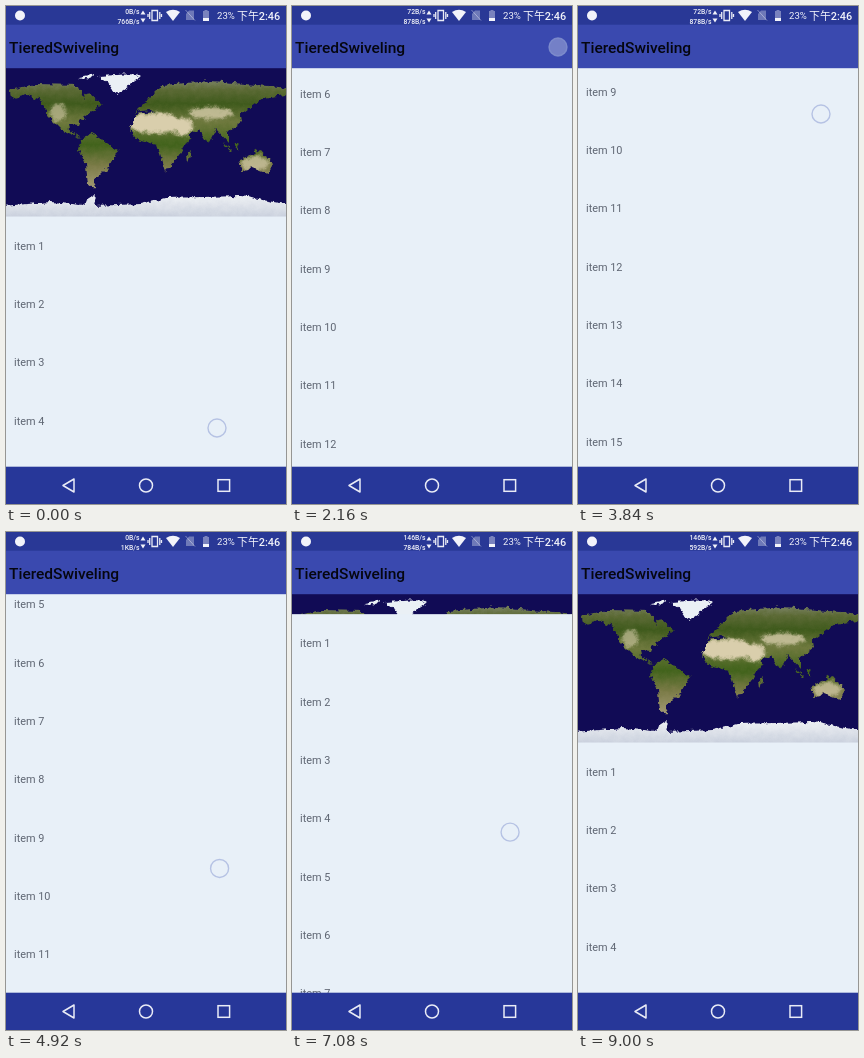
Write an HTML page that moves like this. It is 280 by 498 pixels and loops after 9.24 s.

```html
<!DOCTYPE html>
<html lang="en">
<head>
<meta charset="utf-8">
<title>Nested list</title>
<style>
  html, body { margin: 0; width: 100%; height: 100%; overflow: hidden; background: #e8f0f8; }
  svg { display: block; width: 100vw; height: 100vh; font-family: Roboto, "Noto Sans CJK SC", "Noto Sans CJK", sans-serif; }
  .item { font-size: 10.9px; fill: #5f6673; }
  .title { font-size: 15.5px; font-weight: 500; fill: #05060f; }
  .speed { font-size: 6.8px; font-weight: 500; text-anchor: end; }
  .line { fill: none; stroke: #e9ebf6; stroke-width: 1.5; }
</style>
</head>
<body>
<svg viewBox="0 0 280 498">
  <defs>
    <linearGradient id="climate" gradientUnits="userSpaceOnUse" x1="0" y1="68" x2="0" y2="182">
      <stop offset="0" stop-color="#8b907c"/>
      <stop offset=".14" stop-color="#5c6a35"/>
      <stop offset=".26" stop-color="#3f5a1c"/>
      <stop offset=".42" stop-color="#6f793e"/>
      <stop offset=".62" stop-color="#42631c"/>
      <stop offset=".8" stop-color="#7b7b47"/>
      <stop offset="1" stop-color="#a39a74"/>
    </linearGradient>
    <linearGradient id="ice" x1="0" y1="0" x2="0" y2="1">
      <stop offset="0" stop-color="#eef1f4"/>
      <stop offset="1" stop-color="#c3cad9"/>
    </linearGradient>
    <clipPath id="landClip"><use href="#land"/></clipPath>
    <filter id="soft" x="-30%" y="-50%" width="160%" height="200%"><feGaussianBlur stdDeviation="1.5"/></filter>
    <filter id="coast" filterUnits="userSpaceOnUse" x="-5" y="60" width="290" height="156" color-interpolation-filters="sRGB">
      <feTurbulence type="fractalNoise" baseFrequency=".16" numOctaves="3" seed="4"/>
      <feDisplacementMap in="SourceGraphic" scale="7" xChannelSelector="R" yChannelSelector="G"/>
    </filter>
  </defs>

  <!-- header picture, uncovered by the list -->
  <rect y="62" width="280" height="149" fill="#110b55"/>
  <g filter="url(#coast)">
    <path id="land" fill="url(#climate)" d="
      M4 84L30 78 72 79 78 92 83 86 96 98 74 114 72 119 62 118 63 125 76 133 57 125 40 108 36 94 20 89 5 93Z
      M77 131L86 128 112 143 103 160 91 172 87 182 82 178 80 160 73 143Z
      M130 108L150 106 170 112 178 125 187 126 174 148 160 165 151 139 132 134 124 124Z
      M129 106L143 92 156 79 205 75 285 82 280 89 257 92 235 108 236 115 222 126 222 136 210 123 202 138 193 123 177 133 167 113 143 104Z
      M233 153L255 145 267 159 262 168 246 162 235 165Z
      M181 148L185 145 182 157Z M228 139L235 136 232 144Z M217 136L227 146 222 144Z M248 142L260 150 252 148Z"/>
    <g clip-path="url(#landClip)"><g filter="url(#soft)" fill="#d9ceac">
      <ellipse cx="148" cy="117" rx="29" ry="10"/>
      <ellipse cx="177" cy="121" rx="10" ry="9"/>
      <ellipse cx="205" cy="107" rx="22" ry="6" opacity=".8"/>
      <ellipse cx="249" cy="157" rx="14" ry="7" opacity=".7"/>
      <ellipse cx="52" cy="106" rx="8" ry="9" opacity=".6"/>
    </g></g>
    <path fill="#eaf0f5" d="M92 70L130 68 135 71 110 88 101 76Z M72 71L90 68 84 74Z"/>
    <path fill="url(#ice)" d="M-5 200L45 196 75 199 90 189 88 200 135 198 160 192 235 190 285 199V216H-5Z"/>
  </g>

  <g id="list"><rect y="210.5" width="280" height="1300" fill="#e8f0f8"/></g>

  <rect y="18" width="280" height="44.2" fill="#3a49af"/>
  <rect width="280" height="18.7" fill="#293896"/>
  <rect y="460.7" width="280" height="37.3" fill="#273799"/>
  <text class="title" x="3" y="47">TieredSwiveling</text>

  <g fill="#f2f3fa">
    <circle cx="14" cy="9.5" r="5"/>
    <text class="speed" id="up" x="133.5" y="8.3"></text>
    <text class="speed" id="down" x="133.5" y="17.5"></text>
    <path d="M134.5 8.5L137 4.5 139.5 8.5Z M134.5 12.5L137 16.5 139.5 12.5Z"/>
    <path d="M160 6Q167 1.5 174 6L167 15Z"/>
    <path opacity=".35" d="M183 4.5H188V14H180V8Z"/>
    <path opacity=".4" d="M198.5 4H201.5V5H203V15H197V5H198.5Z"/>
    <path d="M197 12H203V15H197Z"/>
    <text x="211" y="13" font-size="9.6">23%</text>
    <text x="231" y="13.5" font-size="10.9" font-weight="500">下午2:46</text>
  </g>
  <path d="M179.5 4L189 14.5" class="line" style="stroke-width:1" opacity=".45"/>
  <path class="line" style="stroke-width:1.3" d="M146 4.5H151.5V14.5H146Z M143.7 6V13 M153.8 6V13 M142 8V11 M155.5 8V11"/>
  <g class="line">
    <path d="M68 473V486L57 479.5Z" stroke-linejoin="round"/>
    <circle cx="140" cy="479.5" r="6.5"/>
    <rect x="212" y="473.7" width="11.6" height="11.6"/>
  </g>

  <circle id="touch" r="9" fill="#e8f0f8" fill-opacity=".5" stroke="#a9b6de" stroke-opacity=".8" stroke-width="1.4"/>
</svg>
<script>
const LOOP = 9240, STEP = 120, LAST = 9000, ROW = 58.33;
const FLING_END = 620.7, FLING_DECAY = 343, FADE = 360;
const byId = id => document.getElementById(id);
const list = byId('list'), touch = byId('touch'), up = byId('up'), down = byId('down');

for (let n = 1; n <= 17; n++) {
  const label = document.createElementNS('http://www.w3.org/2000/svg', 'text');
  label.setAttribute('class', 'item');
  label.setAttribute('x', 8);
  label.setAttribute('y', 243.7 + ROW * (n - 1));
  label.textContent = 'item ' + n;
  list.append(label);
}

// pace eases the finger along its path, bend curves the path sideways,
// slop is the travel before the list follows
const drags = [
  { begin: 0, end: 2040, from: { x: 211, y: 422 }, to: { x: 266, y: 41 }, pace: 1.2, bend: 2.4, slop: 11.5, offset: 0 },
  { begin: 3840, end: 5400, from: { x: 243, y: 108 }, to: { x: 207, y: 438 }, pace: 1, bend: 0.55, slop: 8.5, offset: FLING_END },
  { begin: 6000, end: 8640, from: { x: 246, y: 121 }, to: { x: 207, y: 450 }, pace: 0.68, bend: 0.55, slop: 8.5, offset: 299 }
];
// sent and received, one reading per two seconds
const speeds = ['0B 766B', '200B 611B', '72B 878B', '0B 1KB', '146B 784B', '146B 592B'];

const clamp = (v, low, high) => Math.min(high, Math.max(low, v));
const mix = (a, b, k) => a + (b - a) * k;

function fingerAt(drag, t) {
  const k = clamp((t - drag.begin) / (drag.end - drag.begin), 0, 1) ** drag.pace;
  return { x: mix(drag.from.x, drag.to.x, k ** drag.bend), y: mix(drag.from.y, drag.to.y, k) };
}

function offsetAt(drag, t) {
  const travel = drag.from.y - fingerAt(drag, t).y;
  const pulled = Math.sign(travel) * Math.max(0, Math.abs(travel) - drag.slop);
  const offset = Math.max(0, drag.offset + pulled);
  if (drag !== drags[0] || t < drag.end) return offset;
  return mix(FLING_END, offset, Math.exp((drag.end - t) / FLING_DECAY));
}

function draw(now) {
  const t = Math.min(Math.floor(now % LOOP / STEP) * STEP, LAST);
  const scrolling = drags.findLast(drag => t >= drag.begin);
  const touching = drags.find(drag => t < drag.end + FADE) || drags[2];
  const { x, y } = fingerAt(touching, t);
  const visible = t >= touching.begin - STEP ? clamp((touching.end + FADE - t) / FADE, 0, 1) : 0;
  const [sent, received] = speeds[Math.ceil(Math.max(0, t - 100) / 2000)].split(' ');
  list.setAttribute('transform', `translate(0 ${-offsetAt(scrolling, t)})`);
  touch.setAttribute('transform', `translate(${x} ${y})`);
  touch.setAttribute('opacity', visible);
  up.textContent = sent + '/s';
  down.textContent = received + '/s';
}

const start = performance.now();
function tick() {
  draw(performance.now() - start);
  requestAnimationFrame(tick);
}
tick();
</script>
</body>
</html>
```
